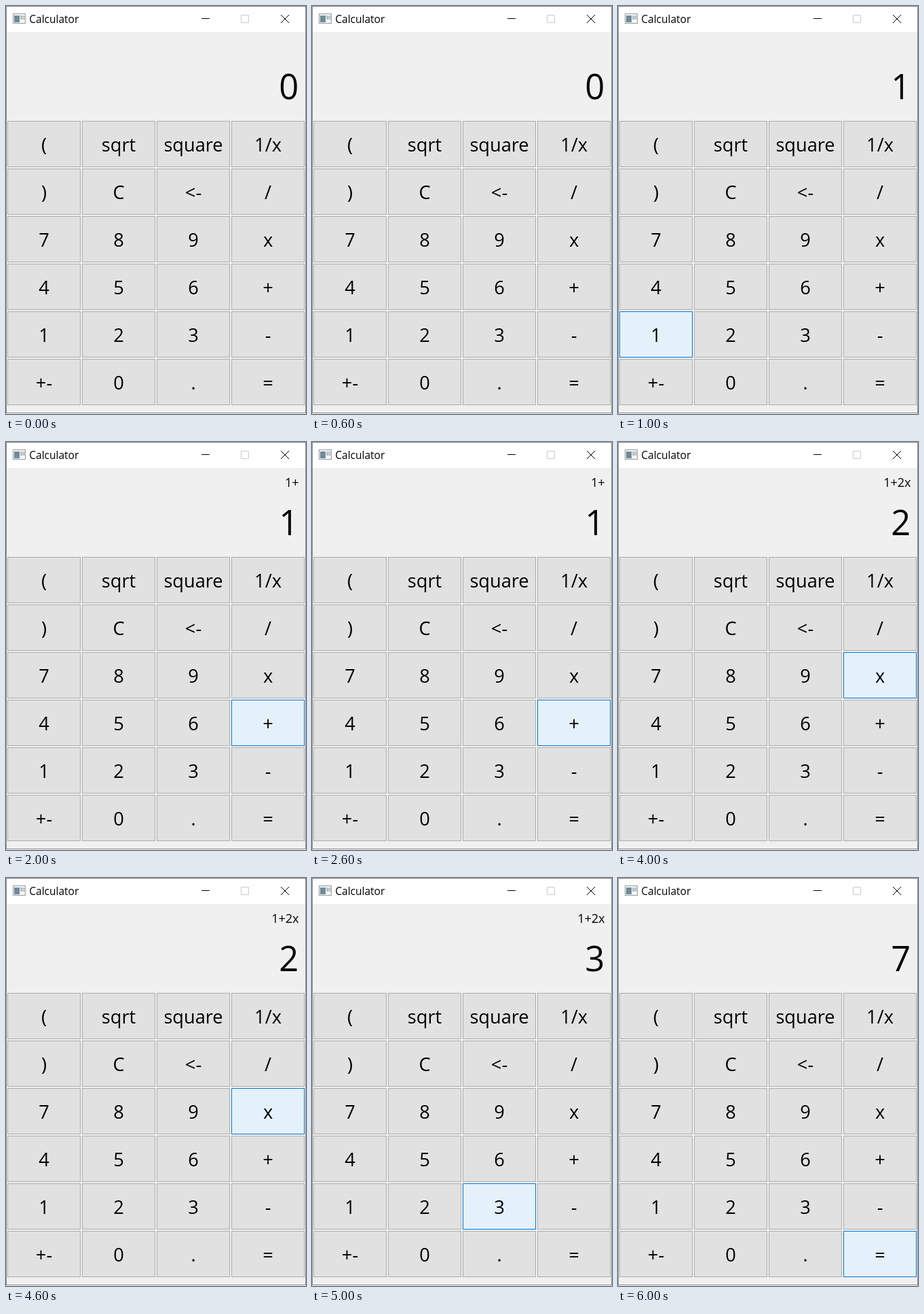
An HTML page that plays this animation: 442 by 600 pixels, repeating every 7 s.

```html
<!DOCTYPE html>
<html lang="en">
<head>
<meta charset="utf-8">
<title>Calculator</title>
<style>
  html, body { margin: 0; width: 100%; height: 100%; overflow: hidden; background: #fff; }
  svg { display: block; font-family: "Open Sans", "Noto Sans", sans-serif; }
  .key rect { fill: #e1e1e1; stroke: #adadad; }
  .key.active rect { fill: #e4f1fb; stroke: #0078d7; }
  .key text { font-size: 27.2px; text-anchor: middle; }
  .display { text-anchor: end; }
</style>
</head>
<body>
<svg width="442" height="600" viewBox="0 0 442 600">
  <rect x=".5" y=".5" width="441" height="598" fill="#f0f0f0" stroke="#858585"/>
  <path d="M1 1h440v37H1z" fill="#fff"/>
  <g id="icon">
    <rect x="10.5" y="11.5" width="18" height="14" fill="#f4f6f7" stroke="#969b9f"/>
    <path d="M12 14h8v10h-8z" fill="#6f8a96"/>
    <path d="M21 14h4v6h-4z" fill="#b9c3c9"/>
    <path d="M26 14h1v6h-1z" fill="#7b8a94"/>
  </g>
  <text x="34.3" y="25" font-size="15.5">Calculator</text>
  <g fill="none" stroke="#000">
    <path d="M288 18.5h12"/>
    <path d="M346.5 13.5h11v11h-11z" stroke="#ccc"/>
    <path d="M405 13l12 12M417 13l-12 12"/>
  </g>
  <text id="expression" class="display" x="431.5" y="66" font-size="18"></text>
  <text id="value" class="display" x="431" y="137" font-size="50.5"></text>
  <g id="keys"></g>
</svg>
<script>
const labels = ["(", "sqrt", "square", "1/x", ")", "C", "<-", "/", "7", "8", "9", "x",
  "4", "5", "6", "+", "1", "2", "3", "-", "+-", "0", ".", "="];
// Each step: pressed key, expression line, main value
const steps = [
  ["", "", "0"],
  ["1", "", "1"],
  ["+", "1+", "1"],
  ["2", "1+", "2"],
  ["x", "1+2x", "2"],
  ["3", "1+2x", "3"],
  ["=", "", "7"]
];
const stepTime = 1000;
const byId = id => document.getElementById(id);

function add(parent, tag, attributes) {
  const node = document.createElementNS("http://www.w3.org/2000/svg", tag);
  for (const name in attributes) node.setAttribute(name, attributes[name]);
  return parent.appendChild(node);
}

const keys = labels.map((label, i) => {
  const x = 2 + i % 4 * 110, y = 169 + Math.floor(i / 4) * 70;
  const key = add(byId("keys"), "g", { class: "key" });
  add(key, "rect", { x: x + .5, y: y + .5, width: 107, height: 67 });
  add(key, "text", { x: x + 54, y: y + 45 }).textContent = label;
  return key;
});

function draw() {
  const step = Math.floor(performance.now() / stepTime) % steps.length;
  const [pressed, expression, value] = steps[step];
  byId("expression").textContent = expression;
  byId("value").textContent = value;
  keys.forEach((key, i) => key.classList.toggle("active", labels[i] === pressed));
  requestAnimationFrame(draw);
}
draw();
</script>
</body>
</html>
```
